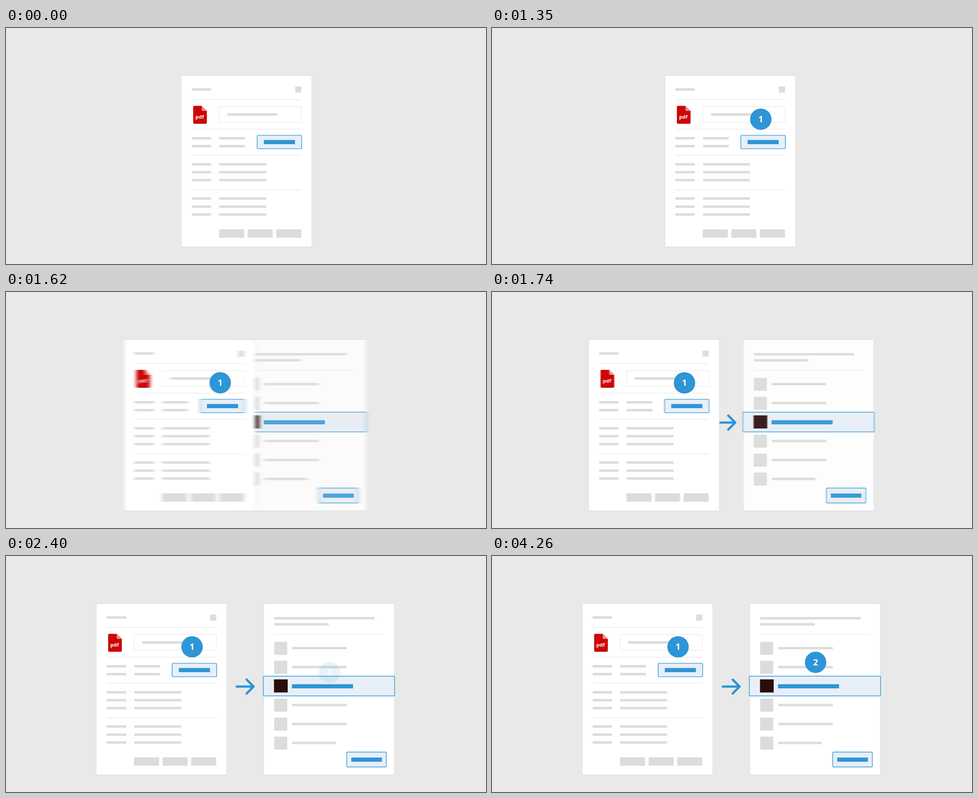
These frames come from a looping animation (1065 by 526 pixels, 4.5 s). An HTML page:

```html
<!DOCTYPE html>
<html lang="en">
<head>
<meta charset="utf-8">
<title>Two steps</title>
<style>
  html, body { margin: 0; width: 100%; height: 100%; overflow: hidden; background: #e9e9e9; }
  svg { display: block; width: 100vw; height: 100vh; }
  text { fill: #fff; font-family: "Noto Sans", "Open Sans", sans-serif; font-weight: 600; text-anchor: middle; }
  .page { fill: #fff; stroke: #d9d9d9; }
  .bar { fill: #dcdcdc; }
  .rule { stroke: #e3e3e3; }
  .field { fill: #fff; stroke: #e3e3e3; }
  .active { fill: #e8eff7; stroke: #2e95d6; stroke-width: 1.4; }
  .blue { fill: #2e95d6; }
</style>
</head>
<body>
<svg viewBox="0 0 1065 526">
  <defs>
    <filter id="blur" filterUnits="userSpaceOnUse" x="0" y="0" width="1065" height="526" color-interpolation-filters="sRGB">
      <feGaussianBlur id="blurAmount" stdDeviation="0 0"/>
    </filter>
  </defs>
  <g id="right"><g class="soft"></g><g class="sharp"></g></g>
  <path id="arrow" d="M512 291H549M534 275.5L549.3 291L534 306.5" fill="none" stroke="#2e95d6" stroke-width="5.2" stroke-linecap="round" stroke-linejoin="round"/>
  <g id="left"><g class="soft"></g><g class="sharp"></g></g>
  <g id="badge2"></g>
</svg>
<script>
const $ = selector => document.querySelector(selector);
const rect = (cls, x, y, w, h, r = 0) =>
  `<rect class="${cls}" x="${x}" y="${y}" width="${w}" height="${h}" rx="${r}"/>`;
const bar = (x, y, w) => rect('bar', x, y, w, 5.4);
const rule = (x, y) => `<path class="rule" d="M${x} ${y}h243.2"/>`;
const badge = (x, y, label) =>
  `<circle class="blue" cx="${x}" cy="${y}" r="23.8"/><text x="${x}" y="${y + 6.9}" font-size="19.3">${label}</text>`;
const rows = (ys, w) => ys.map(y => bar(223.3, y, 43.2) + bar(284.4, y, w)).join('');

const fileIcon = `
  <path fill="#cc0606" d="M229 173.5H245.6L257 184.8V211a2.4 2.4 0 0 1-2.4 2.4H229a2.4 2.4 0 0 1-2.4-2.4V175.9a2.4 2.4 0 0 1 2.4-2.4Z"/>
  <path fill="#f58c8c" d="M245.6 173.5L257 184.8H247.6a2 2 0 0 1-2-2Z"/>
  <text x="241" y="202" font-size="11.4">pdf</text>`;

$('#left .soft').innerHTML =
  rect('page', 200, 106.2, 290, 381.6, 2.5) +
  bar(223.3, 134.3, 43.2) + rect('bar', 453, 130.5, 13.5, 13.5) +
  [159.5, 225.5, 283.2, 361.2].map(y => rule(223.3, y)).join('') +
  fileIcon +
  rect('field', 284.3, 175.2, 182.2, 34.9, 2) + bar(302.3, 190, 110.5) +
  rows([243, 260.6], 57.2) +
  rows([301.1, 318.7, 336.3, 377.3, 395.4, 412.9], 104.3) +
  [284, 347.4, 410.8].map(x => rect('bar', x, 448.4, 55.7, 19.2, 2)).join('') +
  rect('active', 368.6, 239.1, 98.8, 30, 2);
$('#left .sharp').innerHTML =
  rect('blue', 383.4, 249.6, 69.1, 9.3) + '<g id="badge1">' + badge(412.8, 202.5, 1) + '</g>';

$('#right .soft').innerHTML =
  rect('page', 571.8, 106.2, 290, 381.6, 2.5) +
  bar(595, 136, 222.8) + bar(595, 149.5, 121) + rule(595, 175) +
  [191.2, 233.5, 318, 360.3, 402.6].map((y, i) =>
    rect('bar', 595, y, 29, 29, 2) + bar(634.8, y + 11.4, i < 4 ? 121.2 : 97)).join('') +
  rect('active', 570.8, 267.7, 291.4, 44, 1.5) +
  '<rect x="594.6" y="275" width="30.4" height="29.2" fill="#2b0d0d"/>' +
  rect('active', 756, 437, 87.8, 33.3, 2);
$('#right .sharp').innerHTML =
  rect('blue', 634.4, 285.8, 135.6, 9.2) + rect('blue', 766, 449.2, 68, 9.3);

$('#badge2').innerHTML = badge(718, 237, 2);

const LOOP = 4500, STEP = 30;
const SLIDE = { start: 1024, duration: 1125 };
const SHUTTER = 18;
const clamp = v => Math.min(1, Math.max(0, v));

const expoInOut = x => x <= 0 ? 0 : x >= 1 ? 1 :
  x < .5 ? 2 ** (20 * x - 10) / 2 : 1 - 2 ** (10 - 20 * x) / 2;
const slideAt = t => expoInOut((t - SLIDE.start) / SLIDE.duration);

// Rises at a steady pace, then swings out around its resting place.
function badgeOffset(t) {
  if (t < 290) return 25.5 * (1 - t / 290);
  const s = (t - 290) / 1000;
  return -3.3 * Math.sin(5 * Math.PI * s) * Math.exp(-5 * s);
}

function poseBadge(id, t) {
  const el = $(id);
  el.setAttribute('opacity', clamp(t / 300));
  el.setAttribute('transform', `translate(0 ${badgeOffset(Math.max(0, t)).toFixed(3)})`);
}

function render(t) {
  const rest = 1 - slideAt(t);
  const shift = (id, dx) => $(id).setAttribute('transform', `translate(${(dx * rest).toFixed(3)} 0)`);
  shift('#left', 188.7);
  shift('#right', -188.7);
  shift('#arrow', -129);

  const fade = t < 1360 ? 0 : 1 - Math.exp(-(t - 1360) / 148);
  $('#right').setAttribute('opacity', t > 2100 ? 1 : fade);
  $('#arrow').setAttribute('opacity', t < 1360 ? 0 : 1);

  const travel = 188.7 * (slideAt(t + SHUTTER / 2) - slideAt(t - SHUTTER / 2));
  $('#blurAmount').setAttribute('stdDeviation', `${(travel / Math.sqrt(12)).toFixed(3)} 0`);
  for (const el of document.querySelectorAll('.soft')) {
    if (travel > .8) el.setAttribute('filter', 'url(#blur)');
    else el.removeAttribute('filter');
  }

  poseBadge('#badge1', t - 780);
  poseBadge('#badge2', t - 2370);
}

let origin;
function tick(now) {
  origin ??= now;
  const t = (now - origin) % LOOP;
  render(Math.floor(t / STEP + .01) * STEP);
  requestAnimationFrame(tick);
}
render(0);
requestAnimationFrame(tick);
</script>
</body>
</html>
```
